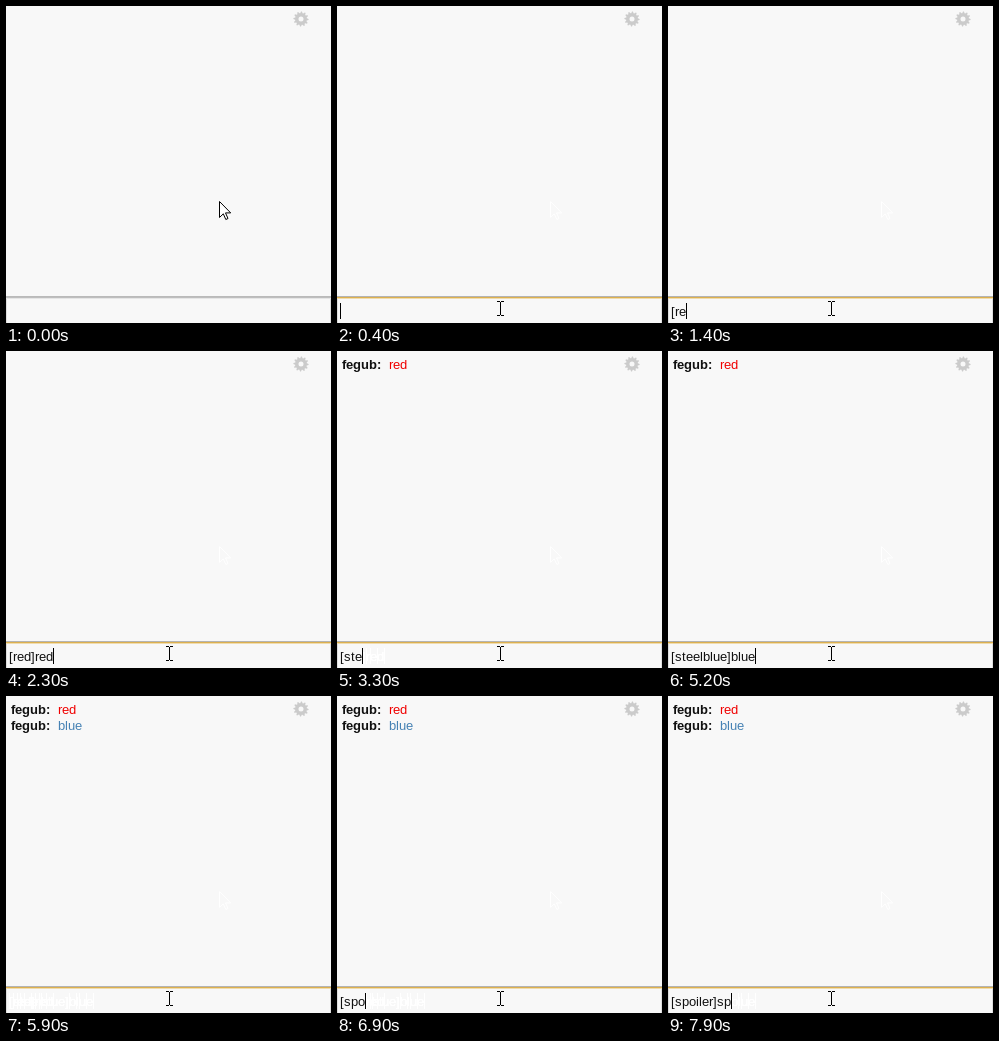
An HTML page with a canvas for the animation above (8 s loop, 325 by 317 pixels).

```html
<!DOCTYPE html>
<html lang="en">
<meta charset="utf-8">
<title>Chat colours</title>
<style>
  html, body { margin: 0; width: 100%; height: 100%; overflow: hidden; background: #f8f8f8; }
  canvas { display: block; }
</style>
<canvas id="stage" width="325" height="317"></canvas>
<script>
const c = document.getElementById('stage').getContext('2d');
const LOOP = 8000, BG = '#f8f8f8', USER = 'fegub';
const FONT = '13px "Liberation Sans", Arial, sans-serif';

// [time, typed text, caret visible]
const typing = [
  [0, '', 0], [400, '', 1], [900, '', 0], [1100, '[', 1], [1300, '[r', 1], [1400, '[re', 1],
  [1700, '[red]', 1], [2000, '[red]r', 1], [2200, '[red]re', 1], [2300, '[red]red', 1],
  [2400, '', 1], [2700, '[', 1], [3000, '[s', 1], [3100, '[st', 1], [3300, '[ste', 1],
  [3700, '[steel', 1], [3900, '[steelblue]', 1], [4400, '[steelblue]', 0],
  [4700, '[steelblue]b', 1], [4800, '[steelblue]bl', 1], [5000, '[steelblue]blu', 1],
  [5200, '[steelblue]blue', 1], [5400, '', 1], [5900, '', 0], [6200, '', 1], [6400, '[', 1],
  [6700, '[s', 1], [6800, '[sp', 1], [6900, '[spo', 1], [7300, '[spoiler]', 1],
  [7700, '[spoiler]s', 1], [7900, '[spoiler]sp', 1]
];
const messages = [[2500, 'red', '#f00000'], [5400, 'blue', '#4682b4']];
const cleared = [[2400, '[red]red'], [5400, '[steelblue]blue']];

function rect(x, y, w, h, color) {
  c.fillStyle = color;
  c.fillRect(x, y, w, h);
}

// Whole-pixel letter advances; returns the end position.
function write(text, x, y, color, bold) {
  c.font = (bold ? 'bold ' : '') + FONT;
  c.fillStyle = color;
  for (const ch of text) {
    c.fillText(ch, x, y);
    x += Math.round(c.measureText(ch).width + .01);
  }
  return x;
}

function gear() {
  c.save();
  c.translate(295, 13);
  c.beginPath();
  for (let i = 0; i < 48; i++) {
    const a = i * Math.PI / 24, r = i % 4 < 2 ? 7.6 : 5.9;
    c.lineTo(r * Math.cos(a), r * Math.sin(a));
  }
  c.closePath();
  c.moveTo(2.5, 0);
  c.arc(0, 0, 2.5, 0, 7);
  c.fillStyle = '#cbcbcb';
  c.fill('evenodd');
  c.restore();
}

const arrowShape = new Path2D('M.5.5V16.5L4.3 12.8 6.8 18.5 9 17.5 6.5 11.9H11.7Z');
function arrow(line, fill) {
  c.save();
  c.translate(213, 195);
  c.fillStyle = fill;
  c.strokeStyle = line;
  c.fill(arrowShape);
  c.stroke(arrowShape);
  c.restore();
}

function beam() {
  for (const y of [295, 309]) {
    rect(160, y, 3, 1, '#000');
    rect(164, y, 3, 1, '#000');
  }
  rect(163, 296, 1, 13, '#000');
}

// Faint white remains of everything typed before.
function remains(t) {
  for (const [at, text] of cleared) if (t >= at) {
    write(text, 3, 310, '#fff');
    write(text, 3, 310, '#fff');
    for (const [time, part] of typing)
      if (time < at && text.startsWith(part)) rect(write(part, 3, 310, '#fff'), 297, 1, 16, '#fff');
  }
}

function input(t) {
  const focus = t >= 300;
  rect(0, 290, 325, 1, focus ? '#b4b4b4' : '#bababa');
  rect(0, 291, 325, 1, focus ? '#dcb050' : '#bebebe');
  rect(0, 292, 325, 1, focus ? '#f0dcae' : '#e6e6e6');
  rect(0, 293, 1, 24, '#dedede');
  rect(324, 293, 1, 24, '#dedede');

  const [, text, caret] = typing.findLast(s => t >= s[0]);
  remains(t);
  if (text) {
    const end = write(text, 3, 310, BG);
    rect(3, 295, end - 2, 20, BG);
  }
  const x = write(text, 3, 310, '#111');
  if (caret) rect(x, 297, 1, 16, '#000');
  else if (t >= 400) rect(x, 297, 1, 16, '#fff');
}

function draw(t) {
  rect(0, 0, 325, 317, BG);
  gear();
  messages.forEach(([at, text, color], i) => {
    if (t < at) return;
    const y = 18 + 16 * i;
    write(text, write(USER + ':  ', 5, y, '#111', true), y, color);
  });
  if (t < 100) arrow('#000', '#fff');
  else arrow('#fff', BG);
  input(t);
  if (t >= 100) beam();
}

const start = performance.now();
function frame() {
  draw((performance.now() - start) % LOOP);
  requestAnimationFrame(frame);
}
frame();
</script>
</html>
```
